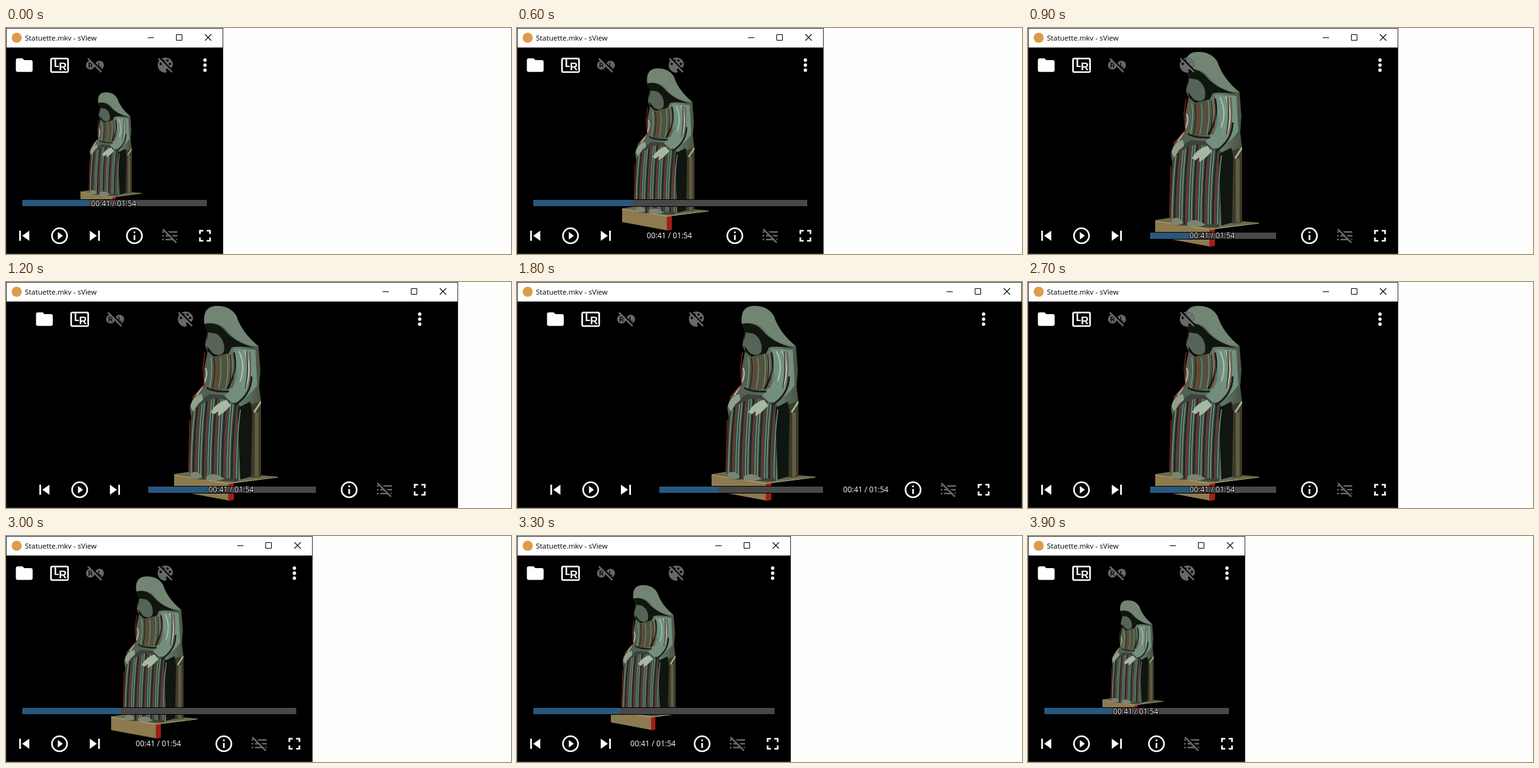
An HTML page with a canvas for the animation above (4200 ms loop, 802 px wide and 359 px high).

```html
<!DOCTYPE html>
<html lang="en">
<head>
<meta charset="utf-8">
<title>Resizing player window</title>
<style>
html, body { margin: 0; width: 100%; height: 100%; overflow: hidden; background: #fefefc; }
canvas { display: block; }
</style>
</head>
<body>
<canvas id="stage" width="802" height="359"></canvas>
<script>
const ctx = document.getElementById('stage').getContext('2d');
const STEP = 300;
const WIDTHS = [345, 399, 487, 588, 718, 755, 802, 755, 718, 588, 487, 435, 399, 345];
const TIME = '00:41 / 01:54', PROGRESS = 41 / 114;
const GRAY = '#686868';
const RING = 'M12 2C6.48 2 2 6.48 2 12s4.48 10 10 10 10-4.48 10-10S17.52 2 12 2zm0 2c4.41 0 8 3.59 8 8s-3.59 8-8 8-8-3.59-8-8 3.59-8 8-8z';
const hole = (x, y) => `M${x - 1.5} ${y}a1.5 1.5 0 1 0 3 0a1.5 1.5 0 1 0-3 0z`;
const dot = y => `M10 ${y}a2 2 0 1 0 4 0a2 2 0 1 0-4 0z`;
const row = y => `M3 ${y}h2v2h-2zM7 ${y}h14v2h-14z`;

// Icons on a 24-unit grid
const ICONS = {
  folder: 'M10 4H4c-1.1 0-2 .9-2 2v12c0 1.1.9 2 2 2h16c1.1 0 2-.9 2-2V8c0-1.1-.9-2-2-2h-8l-2-2z',
  prev: 'M6 6h2v12H6zm3.5 6l8.5 6V6z',
  next: 'M6 18l8.5-6L6 6zM16 6v12h2V6z',
  play: RING + 'M10 16.5l6-4.5-6-4.5z',
  info: RING + 'M11 17h2v-6h-2zM11 9h2V7h-2z',
  full: 'M7 14H5v5h5v-2H7zM5 10h2V7h3V5H5zM17 17h-3v2h5v-5h-2zM14 5v2h3v3h2V5z',
  menu: dot(6) + dot(12) + dot(18),
  palette: 'M12 3c-4.97 0-9 4.03-9 9s4.03 9 9 9c.83 0 1.5-.67 1.5-1.5 0-.39-.15-.74-.39-1.01-.23-.26-.38-.61-.38-.99 0-.83.67-1.5 1.5-1.5H16c2.76 0 5-2.24 5-5 0-4.42-4.03-8-9-8z'
    + hole(6.5, 10.5) + hole(9.5, 6.5) + hole(14.5, 6.5) + hole(17.5, 10.5),
  list: row(6.5) + row(11) + row(15.5)
};
for (const k in ICONS) ICONS[k] = new Path2D(ICONS[k]);

function fill(color, d) {
  ctx.fillStyle = color;
  ctx.fill(typeof d === 'string' ? new Path2D(d) : d, 'evenodd');
}

function rect(color, x, y, w, h) {
  ctx.fillStyle = color;
  ctx.fillRect(x, y, w, h);
}

function stroke(color, width, d) {
  ctx.strokeStyle = color;
  ctx.lineWidth = width;
  ctx.stroke(new Path2D(d));
}

function disc(color, x, y, r) {
  ctx.fillStyle = color;
  ctx.beginPath();
  ctx.arc(x, y, r, 0, 7);
  ctx.fill();
}

function text(str, x, y, font, color) {
  ctx.font = font;
  ctx.fillStyle = color;
  ctx.fillText(str, x, y);
}

function slash(x, y) {
  stroke('#000', 2.5, `M${x - 9} ${y - 11.5}l21 21`);
  stroke(GRAY, 2.5, `M${x - 11} ${y - 10.5}l21.5 21.5`);
}

function icon(name, x, y, off) {
  ctx.save();
  ctx.translate(x - 16, y - 16);
  ctx.scale(4 / 3, 4 / 3);
  fill(off ? GRAY : '#fff', ICONS[name]);
  ctx.restore();
  if (off) slash(x, y);
}

function stereoIcon(x, y) {
  const font = 'bold 17px "Liberation Sans", sans-serif';
  ctx.strokeStyle = '#fff';
  ctx.lineWidth = 2.6;
  ctx.beginPath();
  ctx.roundRect(x - 13.5, y - 10.5, 27, 21.5, 2);
  ctx.stroke();
  text('L', x - 9, y + 3, font, '#fff');
  ctx.strokeStyle = '#000';
  ctx.strokeText('R', x - 1, y + 8, );
  text('R', x - 1, y + 8, font, '#fff');
}

function swapIcon(x, y) {
  const font = 'bold 10px "Liberation Sans", sans-serif';
  disc(GRAY, x - 7, y, 7);
  disc(GRAY, x + 7.5, y, 7);
  text('R', x - 10.5, y + 3.5, font, '#000');
  text('L', x + 5, y + 3.5, font, '#000');
  slash(x, y);
}

const BODY = new Path2D('M357 66Q354 39 375 38Q398 37 408 54Q416 80 443 102L446 140L444 166L447 190V309L406 317L340 313L333 304L336 214L334 200Q338 179 357 164L357 136L362 111L358 100L362 78Z');

function statue(w) {
  const s = Math.min(1, w / 585);
  ctx.save();
  ctx.translate(w / 2, 194.5);
  ctx.scale(s, s);
  ctx.translate(-401, -194.5);

  // Pedestal
  fill('#6f6a48', 'M309 305L336 301L446 307L474 309L396 320Z');
  fill('#8d7a4e', 'M309 306L395 320V347L309 331Z');
  fill('#a51c18', 'M395 320L404 318V346L395 348Z');
  stroke('#c3bd8f', 1.2, 'M309 306L395 320L474 310');

  const tone = ctx.createLinearGradient(333, 0, 448, 0);
  tone.addColorStop(0, '#4e5c4e');
  tone.addColorStop(.35, '#556354');
  tone.addColorStop(.7, '#647a69');
  tone.addColorStop(1, '#48503f');
  fill(tone, BODY);

  ctx.save();
  ctx.clip(BODY);
  fill('#3c4339', 'M336 212Q345 190 365 178L392 180L414 196L411 318H334Z');
  fill('#3a3c2c', 'M424 196L447 190V310H420Z');
  fill('#11150f', 'M410 200L430 190L433 207L431 309L414 314Z');
  // Hood, its shadow and the beard
  fill('#728573', 'M356 66Q354 39 375 38Q398 37 408 54Q418 82 443 102Q411 101 390 73Q377 62 356 66Z');
  fill('#11150f', 'M357 67Q376 62 389 76Q404 95 438 105Q410 101 400 104Q394 122 378 124L362 110L360 78Z');
  fill('#566458', 'M363 80L376 82Q391 92 388 111Q382 120 370 113L360 100Z');
  // Chest and sleeves
  fill('#52513d', 'M371 119L396 113L400 168L368 173Z');
  fill('#748e7d', 'M404 106L438 108L441 164Q424 188 401 192L389 181L411 155Z');
  stroke('#171d17', 3, 'M404 112Q411 142 393 170M361 168Q372 175 396 174M432 150Q432 178 405 196');
  stroke('#a9c7b2', 2, 'M412 110Q423 132 414 158M421 109Q434 137 422 168M359 137Q366 151 345 180');

  // Folds with red and cyan fringes
  ['#7b9c8b', '#151a15', '#8f2c24', '#5aa095'].forEach((color, k) => {
    for (let i = k; i < 20; i += 4) {
      const x = 337 + i * 3.8;
      stroke(color, 1.5, `M${x + 5} ${202 - 17 * Math.sin(i / 6)}Q${x - 1} 250 ${x - 1} 312`);
    }
    for (let i = 0; i < 3; i++) {
      const x = 367 + i * 26 + k * 5;
      stroke(color, 1.2, `M${x} ${120 - i * 5}Q${x + 4} 140 ${x - 2} 169`);
    }
  });
  stroke('#645c40', 6, 'M440 207V309');
  stroke('#a8b594', 3, 'M447 190L436 207');
  ctx.restore();

  // Hands and feet
  fill('#8fa08b', 'M353 178Q339 181 335 197L339 206L347 194L355 187Z');
  fill('#a5b8a2', 'M392 187Q375 192 367 207L373 210L379 205L379 213L388 207L399 196Z');
  fill('#7b8570', 'M335 304Q345 297 354 309Q347 316 335 311ZM360 309Q373 300 389 313Q373 318 360 314Z');
  stroke('#9c251f', 1.3, 'M358 112L355 137L357 162L338 184M334 219L332 301');
  ctx.restore();
}

function timeLabel(cx, y) {
  ctx.textAlign = 'center';
  ctx.font = '12px "Open Sans", "Noto Sans", sans-serif';
  ctx.strokeStyle = '#000';
  ctx.lineWidth = 2;
  ctx.strokeText(TIME, cx, y);
  text(TIME, cx, y, ctx.font, '#fff');
  ctx.textAlign = 'left';
}

function seekBar(x1, x2, y) {
  rect('#000', x1 - 1, y - 1, x2 - x1 + 2, 12);
  rect('#484848', x1, y, x2 - x1, 10);
  rect('#29587f', x1, y, (x2 - x1) * PROGRESS, 10);
}

function controls(w) {
  const pad = w > 600 ? 61 : 29, right = w - pad, top = 59, low = 330;
  icon('folder', pad, top);
  stereoIcon(pad + 56, top);
  swapIcon(pad + 112, top);
  icon('palette', pad + 224, top, true);
  icon('menu', right, top);

  icon('prev', pad, low);
  icon('play', pad + 56, low);
  icon('next', pad + 112, low);
  icon('info', right - 112, low);
  icon('list', right - 56, low, true);
  icon('full', right, low);

  const mid = w / 2 - 1.5;
  if (w < 550) {
    seekBar(26, w - 26, 273);
    timeLabel(mid, w < 420 ? 283 : 334);
  } else if (w > 780) {
    seekBar(226, w - 316, 325);
    timeLabel(w - 248, 334);
  } else {
    seekBar(pad + 165, w - pad - 165, 325);
    timeLabel(mid, 334);
  }
}

function titleBar(w) {
  rect('#fff', 1, 1, w - 2, 30);
  disc('#dc9c48', 17, 15.5, 8);
  text('Statuette.mkv - sView', 30, 20, '11.45px "Open Sans", "Noto Sans", sans-serif', '#000');
  stroke('#000', 1, `M${w - 120} 15.5h10M${w - 74.5} 10.5h9v9h-9z`);
  stroke('#000', 1.1, `M${w - 29} 10l10 10m0-10l-10 10`);
}

function draw(now) {
  const w = WIDTHS[Math.floor(now / STEP) % WIDTHS.length];
  rect('#fefefc', 0, 0, 802, 359);
  rect('#2b2f33', 0, 0, w, 359);
  rect('#000', 1, 31, w - 2, 327);
  titleBar(w);
  statue(w);
  controls(w);
}

const start = performance.now();
function loop() {
  draw(performance.now() - start);
  requestAnimationFrame(loop);
}
loop();
</script>
</body>
</html>
```
